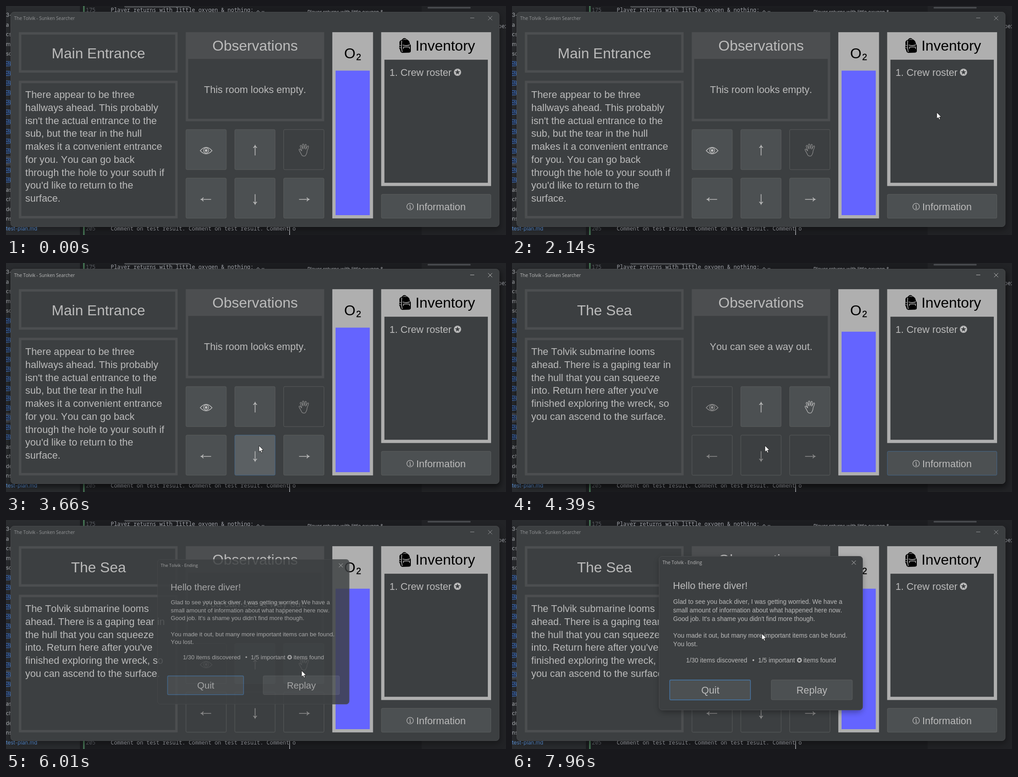
Write an HTML page that moves like this. It is 1103 by 508 pixels and loops after 8 s.

```html
<!DOCTYPE html>
<html lang="en">
<head>
<meta charset="utf-8">
<title>Dive game</title>
<style>
html, body { margin: 0; width: 100%; height: 100%; overflow: hidden; background: #1c1d20; }
svg { display: block; width: 1103px; height: 508px; }
text { font-family: "Liberation Sans", Arial, sans-serif; font-size: 21.8px; font-kerning: none; fill: #bbb; white-space: pre; }
.big { font-size: 32px; }
.small { font-size: 13.88px; }
.title { font-family: "Open Sans", "Noto Sans", sans-serif; font-size: 10px; fill: currentColor; }
.mono { font-family: "Noto Sans Mono", "DejaVu Sans Mono", monospace; font-size: 11.95px; fill: #a4a7ad; }
.side { font-family: Inter, sans-serif; font-size: 11.5px; fill: #b4b7bc; }
.mid { text-anchor: middle; }
.ink { fill: none; stroke: currentColor; }
.btn text { fill: currentColor; }
</style>
</head>
<body>
<svg id="stage" viewBox="0 0 1103 508" xmlns="http://www.w3.org/2000/svg"></svg>
<script>
const LOOP = 8000;
const BG = '#3c3f41', EDGE = '#4c4e50', LIGHT = '#afafaf', RIM = '#5e6060', BLUE = '#466d94';
const FACE = '#4c5052', HOVER = '#54585b', PRESS = '#5b6063';

// layout grid: 20 units of gap, 100 units per small button
const UNIT = .898, gx = u => 28.4 + u * UNIT, gy = v => 58.1 + v * UNIT;

const rect = (x, y, x2, y2, fill, more = '') =>
  `<rect x="${x}" y="${y}" width="${x2 - x}" height="${y2 - y}" fill="${fill}" ${more}/>`;
const cell = (u, v, w, h, fill, more) => rect(gx(u), gy(v), gx(u + w), gy(v + h), fill, more);
const panel = (u, v, w, h, head, rim, edge) =>
  cell(u, v, w, h, edge) + cell(u + rim, v + head, w - 2 * rim, h - head - rim, BG);
const text = (x, y, str, cls = '', more = '') =>
  `<text x="${x}" y="${y}" class="${cls}" ${more}>${str.replace(/&/g, '&amp;')}</text>`;
const lines = (x, y, step, list, cls) =>
  list.map((s, i) => text(x, y + i * step, s, cls)).join('');
const ink = (d, w = 1.4) => `<path class="ink" d="${d}" stroke-width="${w}"/>`;
const group = (id, body, more = '') => `<g id="${id}" ${more}>${body}</g>`;
const cross = (x, y) => ink(`M${x} ${y}l9 9m0 -9l-9 9`, 1);

function star(x, y, r) {
  let d = '';
  for (let i = 0; i < 10; i++) {
    const a = -Math.PI / 2 + i * Math.PI / 5, q = r * (i % 2 ? 0.31 : 0.78);
    d += `${i ? 'L' : 'M'}${(x + q * Math.cos(a)).toFixed(2)} ${(y + q * Math.sin(a)).toFixed(2)}`;
  }
  return `<circle cx="${x}" cy="${y}" r="${r}" fill="#bbb"/><path d="${d}Z" fill="${BG}"/>`;
}

function arrow(x, y, turn) {
  return `<g transform="translate(${x} ${y}) rotate(${turn})">${ink('M0 11V-10.5M-4 -6Q-1 -8 0 -11Q1 -8 4 -6', 1.6)}</g>`;
}

const eye = ink('M428.5 321Q441.5 306 454.5 321Q441.5 335 428.5 321Z', 1.6) +
  '<circle class="ink" cx="441.5" cy="320.5" r="5.6" stroke-width="1.5"/>' +
  '<circle cx="441.5" cy="320.5" r="2.9" fill="currentColor"/>';

const hand = ink('M653 331.5C650.5 327 648.5 323 646.6 319.6C645.6 317.4 648 316.6 649.6 318.5L652.6 321.8' +
  'L649 311.5C648.5 309 651 308.3 651.9 310.5L654.6 317.5L654 308C654 305.4 656.6 305.4 656.9 308L657.6 317' +
  'L659.6 308.5C660.2 306 662.7 306.6 662.3 309L661 318L664.6 311.6C666 309.4 668.3 310.6 667.3 313' +
  'L664.2 321.5C664 326 662.5 329.5 660 332.5Q656 333.8 653 331.5Z', 1.2);

const pack =
  '<path d="M868 83Q867 78 871 76L874 74.5Q876 70 881 71.5L884 74Q890 76 891 84L893 87V99Q893.5 103 889 103.5L874 104Q870 103 869.5 98L867.5 94Z" fill="#000"/>' +
  `<g fill="none" stroke="${LIGHT}" stroke-width="1.6"><path d="M873 77Q871.5 90 874 102M875 86.5Q884 89.5 891 86M877 95V91H890V95"/>` +
  '<path d="M876.5 75Q880 73 883 75M868 87l4 1M868 92l4 1" stroke-width="1.2"/></g>';

// grid x, y, width, height, icon
const BUTTONS = {
  look: [410, 240, 100, 100, eye],
  up: [530, 240, 100, 100, arrow(549.5, 320.5, 0)],
  grab: [650, 240, 100, 100, hand],
  left: [410, 360, 100, 100, arrow(441.5, 429, -90)],
  down: [530, 360, 100, 100, arrow(549.5, 428.5, 180)],
  right: [650, 360, 100, 100, arrow(657.5, 429, 90)],
  info: [890, 400, 270, 60,
    '<circle class="ink" cx="891.5" cy="445" r="7.2" stroke-width="1.3"/>' +
    ink('M889.8 443.4h2v5.2M889.6 448.8h4.2M891.2 440.4v1.6', 1.2) + text(905, 452.5, 'Information')]
};
const button = (id, [u, v, w, h, icon]) => group(id,
  cell(u + .5, v + .5, w - 1, h - 1, FACE, `stroke="${RIM}" stroke-width=".9" rx="2.5"`) + icon, 'class="btn"');

function backdrop() {
  let s = rect(0, 0, 163, 508, '#2a2c2f') + rect(163, 0, 917, 508, '#1c1d20') + rect(917, 0, 1103, 508, '#222326');
  s += rect(0, 333, 163, 354, '#43454a') + rect(170, 0, 173.5, 508, '#447152');
  s += rect(261, -3, 405, 4, '#46484b', 'rx="3"') + rect(930, 2, 1025, 5.5, '#4a4c50', 'rx="1.5"');
  s += text(176, 13, '175', 'mono', 'style="fill:#5d6066"') + text(176, 498, '205', 'mono', 'style="fill:#5d6066"');
  s += text(231, 13, 'Player returns with little oxygen & nothing:', 'mono');
  s += text(231, 498, 'Comment on test result. Comment on test result. Comment o', 'mono');
  s += rect(625, 488, 626.2, 508, '#ced0d6') + ink('M553 13l3 -3l3 3M564 12h6', 1.2);
  s += text(665, 17, 'Player returns with little oxygen &', 'side', 'style="font-size:10.6px"');
  s += text(1086, 49, 'per', 'mono');
  const names = { 20: '3-p', 42: 'a', 63: 'cs', 85: 'm', 106: 'sc', 408: 'as', 429: 'ch', 451: 'de', 472: 'ns' };
  for (const y in names) s += text(0, +y + 4, names[y], 'side');
  for (let i = 0; i < 13; i++) {
    const y = 128 + i * 21.5;
    s += `<g color="#4a83d6" transform="translate(0 ${y})">` +
      rect(-4, -5, 9.5, 5, '#25324d', 'stroke="#4a83d6" rx="1"') + ink('M-2 4l4 -5l3 3l2 -2l3 3', 1) +
      '<circle cx="6" cy="-2" r="1.2" fill="#4a83d6"/></g>';
  }
  return s + text(0, 498, 'test-plan.md', 'side', 'style="fill:#5c94dc"');
}

const shadow = (id, x, y, x2, y2) => rect(x, y, x2, y2, '#000', `id="${id}" rx="8" filter="url(#soft)"`);

function room(id, name, seen, story) {
  return group(id, text(204, 116, name, 'big mid') + text(549.5, 193, seen, 'mid') + lines(42.6, 204, 28.75, story));
}

function mainWindow() {
  return shadow('glow', 8, 18, 1091, 497) +
    rect(10.5, 13.5, 1088, 489.5, BG, 'rx="7" stroke="#47494b"') +
    group('bar', text(18, 31, 'The Tolvik - Sunken Searcher', 'title') + ink('M1024 26.5h9', 1) + cross(1063.5, 22.5)) +
    panel(0, 0, 390, 100, 6, 6, EDGE) +
    panel(0, 120, 390, 340, 6, 6, EDGE) +
    panel(410, 0, 340, 220, 66, 6, EDGE) +
    text(549.5, 99, 'Observations', 'big mid') +
    cell(770, 0, 100, 460, LIGHT) +
    text(746, 116, 'O', 'big', 'style="fill:#000"') +
    text(772.5, 120, '2', '', 'style="fill:#000;font-size:19.5px" stroke="#000" stroke-width=".4"') +
    cell(778, 95, 84, 357, '#6464ff', 'id="air"') +
    panel(890, 0, 270, 380, 68, 8, LIGHT) + pack +
    text(903.2, 99, 'Inventory', 'big', 'style="fill:#000"') +
    text(846, 154.5, '1. Crew roster') + star(996, 147, 8) +
    room('wreck', 'Main Entrance', 'This room looks empty.', [
      'There appear to be three', 'hallways ahead. This probably', "isn't the actual entrance to the",
      'sub, but the tear in the hull', 'makes it a convenient entrance', 'for you. You can go back',
      'through the hole to your south if', "you'd like to return to the", 'surface.']) +
    room('sea', 'The Sea', 'You can see a way out.', [
      'The Tolvik submarine looms', 'ahead. There is a gaping tear in', 'the hull that you can squeeze',
      "into. Return here after you've", 'finished exploring the wreck, so', 'you can ascend to the surface.']) +
    Object.entries(BUTTONS).map(([id, b]) => button(id, b)).join('');
}

function dialog() {
  return group('ending', shadow('drop', 326, 86, 772, 426) +
    rect(324.5, 80.5, 773.5, 421.5, BG, 'rx="7" stroke="#4a4c4e"') +
    `<g color="#bbb">${text(332, 98, 'The Tolvik - Ending', 'title')}${cross(749.5, 90)}</g>` +
    text(355, 153, 'Hello there diver!') +
    lines(355.5, 186, 18.8, ['Glad to see you back diver, I was getting worried. We have a',
      'small amount of information about what happened here now.',
      "Good job. It's a shame you didn't find more though.", '',
      'You made it out, but many more important items can be found.', 'You lost.'], 'small') +
    text(384, 316, '1/30 items discovered', 'small') + text(530, 316, '•', 'small') +
    text(543, 316, '1/5 important', 'small') + star(634, 311, 5.4) + text(643, 316, 'items found', 'small') +
    rect(348, 355, 526, 399, FACE, `stroke="${BLUE}" stroke-width="1.8" rx="2.5"`) + text(437.5, 385, 'Quit', 'mid') +
    rect(572, 354.8, 750.8, 398.8, FACE, `stroke="${RIM}" stroke-width=".9" rx="2.5"`) + text(661.5, 385, 'Replay', 'mid'));
}

const stage = document.getElementById('stage');
stage.innerHTML = '<defs><filter id="soft" x="-20%" y="-20%" width="140%" height="140%"><feGaussianBlur stdDeviation="7"/></filter></defs>' +
  group('back', backdrop(), 'color="#888b90"') + mainWindow() + dialog() +
  group('mouse', '<path d="M0 0V14.2L3.3 11.2L5.6 16.2L7.9 15.2L5.7 10.3H10Z" fill="#fff" stroke="#111" stroke-width=".9"/>');

const $ = id => document.getElementById(id);
const set = (el, props) => { for (const k in props) el.setAttribute(k, props[k]); };
const show = (id, on) => set($(id), { visibility: on ? 'visible' : 'hidden' });

// start, end, then the points the pointer passes
const LEGS = [
  [70, 450, [962, 455], [956, 380], [950, 297]],
  [660, 1450, [950, 297], [1005, 240], [1021, 150], [950, 80], [850, 97], [815, 165], [860, 235]],
  [1520, 2140, [860, 235], [960, 259], [1034, 190], [960, 102], [850, 115], [820, 175], [937, 236]],
  [2410, 3180, [937, 236], [740, 335], [558, 399]],
  [3250, 3310, [558, 399], [558, 405]],
  [4390, 5000, [558, 405], [652, 334]],
  [7090, 7840, [652, 334], [555, 265], [440, 234], [360, 246], [456, 301]],
  [7840, 7960, [456, 301], [551, 252]]
];

function along(pts, u) {
  const n = pts.length - 1, f = u * n, i = Math.min(n - 1, Math.floor(f)), k = f - i;
  const at = j => pts[Math.max(0, Math.min(n, j))];
  return [0, 1].map(c => {
    const a = at(i - 1)[c], b = at(i)[c], d = at(i + 1)[c], e = at(i + 2)[c];
    return b + k / 2 * (d - a + k * (2 * a - 5 * b + 4 * d - e + k * (3 * (b - d) + e - a)));
  });
}

function pointer(t) {
  let leg = LEGS[0];
  for (const l of LEGS) if (t >= l[0]) leg = l;
  const [t0, t1, ...pts] = leg;
  const u = Math.max(0, Math.min(1, (t - t0) / (t1 - t0)));
  return along(pts, u * u * (3 - 2 * u));
}

// time, scale, opacity and shadow of the opening dialog
const OPENING = [[5950, .91, .3, 0], [6010, .9415, .82, 0], [6070, .975, .97, .1], [6150, .994, 1, .25], [6230, 1, 1, .35]];

function draw(t) {
  const sea = t >= 3750, ended = t >= 5950, active = t >= 3660 && !ended;
  const [mx, my] = pointer(t);
  show('mouse', t >= 70);
  set($('mouse'), { transform: `translate(${mx.toFixed(2)} ${my.toFixed(2)})` });

  show('wreck', !sea);
  show('sea', sea);
  const level = sea ? 105 : 95;
  set($('air'), { y: gy(level), height: (452 - level) * UNIT });
  set($('bar'), { color: active ? '#bbb' : '#949698' });
  set($('glow'), { opacity: active ? .55 : .3 });

  const off = sea ? ['look', 'left', 'down', 'right'] : ['grab'];
  const held = t >= 3660 && t < 3750 ? 'down' : t >= 5600 && t < 5800 ? 'grab' : '';
  const focus = sea && t < 5600 ? 'info' : '';
  for (const id in BUTTONS) {
    const [u, v, w, h] = BUTTONS[id], dead = off.includes(id);
    const over = !dead && !ended && t >= 70 &&
      mx >= gx(u) && mx < gx(u + w) && my >= gy(v) && my < gy(v + h);
    set($(id), { color: dead ? '#8c8c8c' : '#bbb' });
    set($(id).firstChild, {
      fill: dead ? BG : held === id ? PRESS : over ? HOVER : FACE,
      stroke: over || focus === id ? BLUE : RIM
    });
  }

  show('ending', ended);
  if (ended) {
    const [, s, o, dark] = OPENING.filter(k => t >= k[0]).pop();
    set($('ending'), { opacity: o, transform: `translate(${492 * (1 - s)} ${200 * (1 - s)}) scale(${s})` });
    set($('drop'), { opacity: dark });
  }
}

function tick() {
  draw(performance.now() % LOOP);
  requestAnimationFrame(tick);
}
tick();
</script>
</body>
</html>
```
